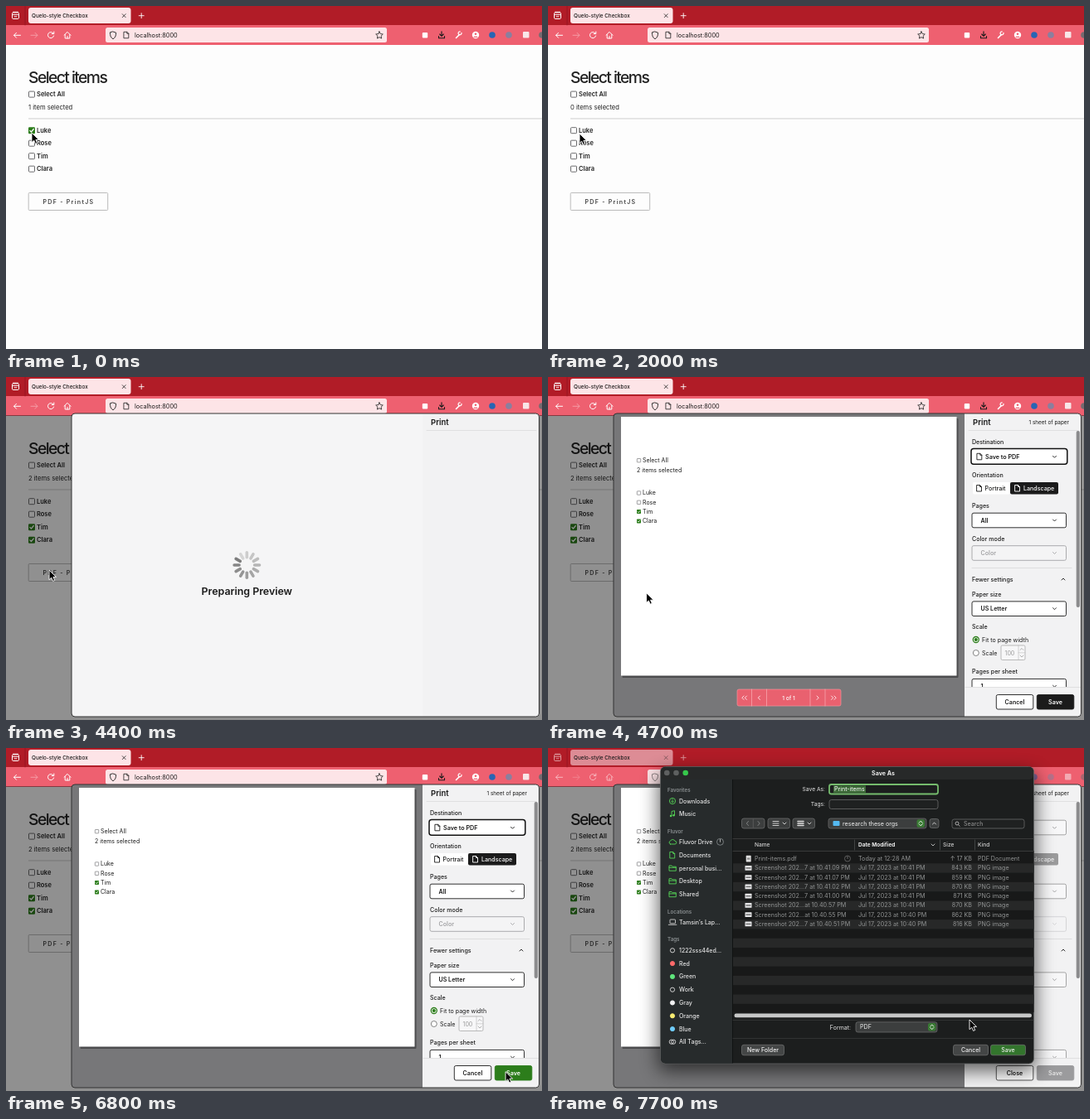
Write an HTML page that moves like this. It is 646 by 414 pixels and loops after 8 s.

```html
<!DOCTYPE html>
<html lang="en">
<head>
<meta charset="utf-8">
<title>Select items</title>
<style>
html, body { margin: 0; width: 100%; height: 100%; overflow: hidden; background: #fdfdfd; }
svg { display: block; width: 646px; height: 414px; font-family: Inter, Roboto, sans-serif; }
text { white-space: pre; }
</style>
</head>
<body>
<svg id="stage" viewBox="0 0 646 414"></svg>
<script>
const LOOP = 8000, STEP = 100;
const GREEN = '#2c7d1b', INK = '#1b1b1b';
const NAMES = ['Luke', 'Rose', 'Tim', 'Clara'];

// Markup helpers; text is placed by its vertical middle.
const text = (x, y, s, size = 7.1, fill = INK, weight = 400, extra = '') =>
  `<text x="${x}" y="${y + size * 0.36}" font-size="${size}" fill="${fill}" font-weight="${weight}" ${extra}>${s}</text>`;
const rect = (x, y, w, h, fill = 'none', r = 0, stroke = 'none', sw = 1, extra = '') =>
  `<rect x="${x}" y="${y}" width="${w}" height="${h}" rx="${r}" fill="${fill}" stroke="${stroke}" stroke-width="${sw}" ${extra}/>`;
const dot = (x, y, r, fill, stroke = 'none', sw = 0.9) =>
  `<circle cx="${x}" cy="${y}" r="${r}" fill="${fill}" stroke="${stroke}" stroke-width="${sw}"/>`;
const line = (d, stroke, sw = 1) =>
  `<path d="${d}" fill="none" stroke="${stroke}" stroke-width="${sw}" stroke-linecap="round" stroke-linejoin="round"/>`;
const group = (id, body, attrs = '') => `<g id="${id}" ${attrs}>${body}</g>`;
const chevron = (x, y, up, color = INK) => line(`M${x - 2} ${y + (up ? 1 : -1)}l2 ${up ? -2 : 2}l2 ${up ? 2 : -2}`, color, 0.9);
const sheet = (x, y, color) => line(`M${x} ${y}h3.5l2 2v5.5h-5.5zM${x + 3.5} ${y}v2h2`, color, 0.9);
const MIDDLE = 'text-anchor="middle"', RIGHT = 'text-anchor="end"';

function box(x, y, size, on) {
  const k = size / 8;
  if (!on) return rect(x + k / 2, y + k / 2, size - k, size - k, '#fff', 0.8 * k, '#6b6b6d', k);
  return rect(x, y, size, size, GREEN, 1.2 * k) +
    line(`M${x + 1.8 * k} ${y + 4.2 * k}l${1.6 * k} ${1.6 * k}l${2.9 * k} ${-3.5 * k}`, '#fff', 1.2 * k);
}

function browser() {
  const w = '#fff';
  return rect(0, 0, 646, 24, '#b11c27') + rect(0, 23, 646, 24, '#ee6070') +
    line('M23 0v23', '#8f1420', 0.7) + rect(27, 2, 123.5, 19, '#fde4e7', 3, 'none', 1, 'id="tab"') +
    text(31, 12, 'Quelo-style Checkbox', 6.35, INK, 500) +
    rect(120, 26, 339, 18, '#fde4e7', 2.5) + text(155, 35.3, 'localhost:8000', 7.3) +
    group('icons',
      rect(7.5, 8, 8, 7.5, 'none', 1.2, w, 1) + line('M7.5 10.5h8M10 12.8h3M8.5 7.2h6', w, 0.9) +
      line('M140.2 9.7l4 4m0-4l-4 4', '#222', 0.8) + line('M160.2 11.7h6m-3-3v6', w, 0.9) +
      line('M17.5 35.3h-8l3-3m-3 3l3 3', w, 1) + line('M30 35.3h8l-3-3m3 3l-3 3', '#f59ba5', 1) +
      line('M57 33a3.6 3.6 0 1 0 .6 3M57.8 31v2.6h-2.6', w, 1) +
      line('M70 35.3l4-4l4 4M71.2 34.6v4.4h5.6v-4.4M74 39v-2.5', w, 1) +
      line('M129 31l3.6 1.2c0 4-1 6-3.6 7.6c-2.6-1.6-3.6-3.6-3.6-7.6z', '#333', 1) + sheet(142.3, 31.3, '#333') +
      line('M450 30.8l1.3 2.8l3 .4l-2.2 2.1l.5 3l-2.6-1.4l-2.6 1.4l.5-3l-2.2-2.1l3-.4z', '#333', 0.9) +
      rect(501.8, 32, 6.4, 6.4, w, 1) +
      line('M525 30.8v5.5m-2.3-2.3l2.3 2.3l2.3-2.3M521.5 36.5v2.3h7v-2.3', INK, 1.1) +
      line('M542.5 38.5l4-4', w, 1.6) + line('M549 32.3a2 2 0 1 1-1.8-1.5', w, 1.2) +
      dot(566, 35, 4.2, w) + dot(566, 33.8, 1.3, '#ee6070') + line('M564.2 37.3h3.6', '#ee6070', 1.2) +
      dot(586, 35, 3.8, '#2765b4') + dot(606, 35, 3.8, '#8a7f9e') + rect(623, 31, 7.5, 7.5, '#f8e6e8', 1) +
      dot(646, 35, 3.8, '#766a70'));
}

function page() {
  return text(27, 86, 'Select items', 19.3, '#222', 500, 'letter-spacing="-1.55"') +
    text(37, 106.6, 'Select All', 7.5, '#222', 600) + group('boxes', '') +
    `<text id="count" x="27" y="125.2" font-size="7.6" fill="#222"></text>` +
    rect(27, 135.2, 619, 1.5, '#dedede') +
    NAMES.map((n, i) => text(37, 150.2 + 15.5 * i, n, 7.5, '#222', 600)).join('') +
    rect(27.2, 225.5, 95.5, 21, 'none', 1, 'none', 1, 'id="pdf"') +
    text(44.5, 236.3, 'PDF - PrintJS', 7, '#444', 600, 'letter-spacing="1.3"');
}

function select(y, label, dim) {
  const c = dim ? '#a3a3a5' : INK;
  return rect(511, y - 8.8, 113.5, 17.6, dim ? '#f4f4f5' : '#fff', 2, c, 0.9) +
    text(521.5, y + 0.2, label, 7.1, c, 600) + chevron(610.5, y, false, c);
}

function settings() {
  const label = (y, s) => text(511, y, s, 7.1, INK, 500);
  return label(78, 'Destination') + rect(511, 87.2, 113.5, 17.6, '#fff', 2, INK, 0.9) +
    group('focus', rect(510, 86.4, 115.8, 18.8, '#fff', 3, '#111', 1.5)) +
    sheet(517.3, 92.3, INK) + text(527, 96.2, 'Save to PDF', 7.2, INK, 600) + chevron(610.5, 96.3) +
    label(118.7, 'Orientation') + rect(512, 127, 45, 14.5, '#fff', 2) + sheet(517, 130.5, INK) +
    text(526.5, 134.3, 'Portrait', 7.1, INK, 500) + rect(557, 127, 58, 14.5, INK, 2) + sheet(563, 130.5, '#fff') +
    text(573, 134.3, 'Landscape', 7.1, '#fff', 500) +
    label(155, 'Pages') + select(173, 'All') +
    label(195.5, 'Color mode') + select(212.5, 'Color', true) +
    label(262, 'Paper size') + select(279.7, 'US Letter') +
    label(301.5, 'Scale') + dot(515.8, 317, 3.5, '#fff', GREEN, 1.3) + dot(515.8, 317, 2.1, GREEN) +
    text(523, 317, 'Fit to page width') + dot(515.8, 333, 3.5, '#fff', '#777') + text(523, 333, 'Scale') +
    rect(546, 324, 29, 17.5, '#f7f7f8', 1.5, '#aaa', 0.8) + text(550.5, 333, '100', 7.1, '#999') +
    line('M567 324v17.5M567 332.8h8', '#bbb', 0.6) + chevron(571, 328.5, true, '#aaa') + chevron(571, 337, false, '#aaa') +
    label(355.5, 'Pages per sheet') + select(373.2, '1') +
    group('hoverSheet', rect(510.5, 364, 114.5, 18.6, GREEN, 2) + text(521.5, 373.4, '1', 7.1, '#fff', 600) + chevron(610.5, 373.2, false, '#fff'));
}

const pill = (id, x, label, fill, color, stroke) => group(id,
  rect(x, 383.5, 44.5, 17.5, fill, 2, stroke, 0.9) + text(x + 22.2, 392.3, label, 7.1, color, 600, MIDDLE));

function pager() {
  const c = '#fff';
  return rect(228, 377, 125, 20, '#e9616f', 2, '#f3929b', 0.7) +
    line('M245.5 377v20M263.5 377v20M316 377v20M334 377v20', '#f6a4ac', 0.8) +
    text(290, 387.2, '1 of 1', 6.6, c, 500, MIDDLE) +
    line('M236 385l-2.2 2.2l2.2 2.2M239.5 385l-2.2 2.2l2.2 2.2M255.5 385l-2.2 2.2l2.2 2.2M324 385l2.2 2.2l-2.2 2.2M341.5 385l2.2 2.2l-2.2 2.2M345 385l2.2 2.2l-2.2 2.2', c, 0.8);
}

function preview() {
  const at = i => 139.8 + 11.3 * i;
  return rect(79, 44, 423, 366, '#777779') + rect(89.5, 50, 405, 313, '#4c4c4e', 1) + rect(88, 48, 404.5, 312.5, '#fff') +
    box(107, 98.2, 5, false) + text(114, 100.6, 'Select All', 7) + text(107, 112.2, '2 items selected', 7) +
    NAMES.map((n, i) => box(107, at(i) - 2.3, 5, i > 1) + text(114, at(i), n, 7)).join('') + group('pager', pager());
}

function printDialog() {
  return rect(0, 46, 646, 368, '#000', 0, 'none', 1, 'opacity=".43"') +
    rect(79, 44, 563.5, 366, '#f5f5f6', 4) +
    `<clipPath id="frame">${rect(79, 44, 563.5, 366, '#fff', 4)}</clipPath><clipPath id="scroll">${rect(502, 65, 141, 309, '#fff')}</clipPath>` +
    `<g clip-path="url(#frame)">` + rect(502, 44, 141, 366, '#f2f2f3') +
    text(512, 54.2, 'Print', 9.5, INK, 600) + line('M507 64.5h132', '#dcdcde', 0.8) +
    group('spinner', '') + group('loading', text(290.3, 258.5, 'Preparing Preview', 12.4, INK, 600, MIDDLE)) +
    group('loaded', preview() + text(628, 54.5, '1 sheet of paper', 6.4, INK, 400, RIGHT) +
      `<g clip-path="url(#scroll)">${group('settings', settings())}</g>` +
      line('M511 230.5h120', '#d8d8da', 0.8) + text(511, 244, 'Fewer settings', 7.1, INK, 500) + chevron(621, 244, true) +
      rect(636.7, 65, 4.3, 213, '#8d8d8f', 2) + line('M503 374.5h139', '#dcdcde', 0.8) +
      pill('cancel', 540.3, 'Cancel', '#fff', INK, INK) + pill('close', 540.3, 'Close', '#fff', INK, '#444') +
      pill('saveIdle', 589.3, 'Save', INK, '#fff', INK) + pill('saveHover', 589.3, 'Save', GREEN, '#fff', GREEN) +
      pill('savePressed', 589.3, 'Save', '#fff', GREEN, GREEN) + pill('saveOff', 589.3, 'Save', '#9b9b9d', '#e6e6e6', '#9b9b9d')) +
    '</g>' + rect(79, 44, 563.5, 366, 'none', 4, '#333', 1);
}

const ACCENT = '#55d356', PALE = '#e6e6e6', DIM = '#929494';

function sidebar() {
  const head = (y, s) => text(144, y, s, 6.2, '#8b9092', 600);
  const item = (y, s, icon) => icon + text(158, y, s, 7, PALE, 500);
  const folder = y => line(`M146 ${y + 2.8}v-5.8h3l1 1.2h4.3v4.6zM146 ${y - 0.6}h8.3`, ACCENT, 0.9);
  const cloud = y => line(`M147.5 ${y + 2.5}h5.5a1.8 1.8 0 0 0 0-3.6a3 3 0 0 0-5.5-.2a2 2 0 0 0 0 3.8z`, ACCENT, 0.9);
  const tags = [['1222sss44ed...'], ['Red', '#ff6a6a'], ['Green', '#5fe57c'], ['Work'], ['Gray', '#f2f2f2'], ['Orange', '#f8ec72'], ['Blue', '#70cdfb']];
  return head(50.5, 'Favorites') + item(64, 'Downloads', dot(150, 64, 3.6, 'none', ACCENT) + line('M150 62v3.6m-1.5-1.5l1.5 1.5l1.5-1.5', ACCENT, 0.8)) +
    item(79.8, 'Music', line('M149 82v-5.5l3.5-.8v5.3', ACCENT, 0.9) + dot(148, 82, 1.2, ACCENT) + dot(151.5, 81.2, 1.2, ACCENT)) +
    head(100.5, 'Fluvor') + item(113.5, 'Fluvor Drive', cloud(113.5)) + dot(207.5, 113.3, 4, 'none', '#8b9092', 0.8) + line('M207.5 113.3v-3', '#bbb', 0.9) +
    item(129.2, 'Documents', sheet(147.2, 125.5, ACCENT)) + item(145, 'personal busi...', folder(145)) +
    item(160.7, 'Desktop', folder(160.7)) + item(176.5, 'Shared', folder(176.5)) +
    head(197.3, 'Locations') + item(210.5, 'Tamsin\u2019s Lap...', rect(147, 207, 6.5, 4.8, 'none', 0.6, '#ccc', 0.9) + line('M145.3 213.3h9.6', '#ccc', 0.9)) +
    head(231, 'Tags') + tags.map(([s, c], i) => item(244.3 + 15.8 * i, s, dot(150, 244.3 + 15.8 * i, 2.6, c || 'none', c || '#ddd'))).join('') +
    item(354.7, 'All Tags...', dot(148.8, 354.7, 2.6, 'none', '#ddd') + dot(151.2, 354.7, 2.6, 'none', '#ddd'));
}

function fileTable() {
  const shots = [['..7 at 10.41.09', 843], ['..7 at 10.41.07', 859], ['..7 at 10.41.02', 870], ['..7 at 10.41.00', 871],
    ['..at 10.40.57', 870], ['..at 10.40.55', 862], ['..7 at 10.40.51', 816]];
  const rows = [['Print-items.pdf', 'Today at 12:28 AM', '\u2191 17 KB', 'PDF Document'],
    ...shots.map(([s, kb], i) => [`Screenshot 202.${s} PM`, `Jul 17, 2023 at 10:${i < 5 ? 41 : 40} PM`, `${kb} KB`, 'PNG image'])];
  let out = rect(223, 124, 362.5, 195, '#181919');
  for (let i = 1; i < 17; i += 2) out += rect(223, 139.3 + 11.3 * (i - 1), 362.5, 11.3, '#272828');
  out += line('M223 109.5h362M223 124.5h362', '#404242', 0.8) + line('M369.5 111v12M472.5 111v12M514.5 111v12', '#4b4d4d', 0.8) +
    text(249, 117, 'Name', 6.6, '#d2d2d2', 500) + text(374, 117, 'Date Modified', 6.5, '#eee', 700) + chevron(464, 117, false, '#ccc') +
    text(476, 117, 'Size', 6.6, '#d2d2d2', 500) + text(518, 117, 'Kind', 6.6, '#d2d2d2', 500);
  rows.forEach(([name, date, size, kind], i) => {
    const y = 133.6 + 11.25 * i;
    out += (i ? rect(237.5, y - 2.8, 8, 5.6, '#e6e6e8', 0.5) + rect(238.5, y - 0.6, 6, 1.4, '#666') : rect(238.7, y - 3.8, 6, 7.6, '#ddd', 0.6) + rect(240, y - 1, 3.4, 2, '#888')) +
      text(249, y, name, 7.2, DIM) + text(374, y, date, 7.2, DIM) + text(511, y, size, 7.1, DIM, 400, RIGHT) + text(518, y, kind, 7.1, DIM);
  });
  return out + dot(361, 133.5, 3.5, 'none', '#777', 0.7) + line('M361 133.5v-2.5', '#888', 0.7) + rect(224.5, 320.5, 358.5, 4.8, '#c6c7c7', 2.4);
}

function saveDialog() {
  const field = (x, y, w, h, fill = '#3c3e3e') => rect(x, y, w, h, fill, 2.5, '#737575', 0.7);
  const stepper = (x, y) => rect(x, y, 9.5, 9.5, '#3a7a34', 2) + chevron(x + 4.75, y + 3, true, '#fff') + chevron(x + 4.75, y + 6.6, false, '#fff');
  const button = (x, w, s, fill) => field(x, 358.3, w, 12.5, fill) + text(x + w / 2, 364.6, s, 7, '#f2f2f2', 500, MIDDLE);
  return `<filter id="soft" x="-20%" y="-20%" width="140%" height="140%"><feGaussianBlur stdDeviation="11"/></filter>` +
    rect(133, 30, 455, 360, '#000', 7, 'none', 1, 'opacity=".6" filter="url(#soft)"') +
    rect(135.5, 22.5, 450, 358.5, '#1c1e1e', 6, '#606262', 0.8) +
    `<path d="M142 23h80.5v357.5h-80.5a6 6 0 0 1-6-6v-345.5a6 6 0 0 1 6-6z" fill="#272b2c"/>` + line('M222.5 38v342', '#0d0e0e', 0.8) +
    rect(136, 23, 449, 15, '#272929', 5) + dot(143.3, 30, 3.3, '#5e6060') + dot(154.5, 30, 3.3, '#5e6060') + dot(165.7, 30, 3.3, '#36c84b') +
    text(404, 30, 'Save As', 7.1, '#eee', 700, MIDDLE) + sidebar() +
    text(334, 50, 'Save As:', 6.7, PALE, 400, RIGHT) + rect(339, 44, 131, 11.5, '#1c1e1e', 2.5, '#75bb6d', 1.8) +
    rect(344, 45.5, 39, 8.5, '#3d6a38') + text(345, 49.8, 'Print-items', 7.1, '#fff') +
    text(334, 68, 'Tags:', 6.7, PALE, 400, RIGHT) + field(339, 62.5, 131, 11, '#1f2121') +
    field(233.5, 85, 27.5, 12) + line('M247.3 86v10', '#666', 0.7) + line('M241.5 88.5l-2.2 2.5l2.2 2.5M253 88.5l2.2 2.5l-2.2 2.5', '#858787', 0.9) +
    field(265, 85, 26.5, 12) + line('M271 88.5h7M271 91h7M271 93.5h7', '#ddd', 0.9) + chevron(285, 91, false, '#ddd') +
    field(295, 85, 26.5, 12) + line('M301 88.5h7M301 91h7M301 93.5h7', '#ddd', 1.6) + chevron(315, 91, false, '#ddd') +
    field(338, 85, 118, 12) + rect(343.5, 88, 8, 6, '#54b9f1', 1) + text(355, 91, 'research these orgs', 7.1, '#f2f2f2') + stepper(444.5, 86.2) +
    field(460, 85.5, 11, 11) + chevron(465.5, 91, true, '#ddd') +
    field(487, 86, 87, 11, '#1f2121') + dot(493, 91, 2, 'none', '#ccc', 0.8) + line('M494.6 92.7l1.6 1.6', '#ccc', 0.8) + text(501, 91.4, 'Search', 7.1, '#999') +
    fileTable() + line('M223 328.5h362M223 350.5h362', '#3b3d3d', 0.7) +
    text(365, 337, 'Format:', 7, PALE, 400, RIGHT) + field(371, 330.7, 98, 12.3) + text(376, 336.9, 'PDF', 7.1, '#eee') + stepper(458, 332) +
    button(233.5, 51, 'New Folder', '#444646') + button(488.5, 42, 'Cancel', '#444646') + button(533.5, 42, 'Save', '#33752d');
}

const stage = document.getElementById('stage');
stage.innerHTML = rect(0, 0, 646, 414, '#fdfdfd') + page() + browser() + group('printDialog', printDialog()) + group('saveDialog', saveDialog()) +
  group('cursor', `<path d="M0 0V11.7L2.7 9.2L4.6 13.4L6.7 12.5L4.9 8.4H8.5Z" fill="#000" stroke="#fff" stroke-width=".9" stroke-linejoin="round"/>`);
const $ = id => document.getElementById(id);
const show = (id, on) => { $(id).style.display = on ? '' : 'none'; };

// Pointer stops: time, x, y.
const PATH = [[0, 31, 153], [300, 31, 166], [500, 32, 167], [700, 31, 181], [900, 33, 180], [1200, 31, 104], [1900, 31, 104],
  [2000, 38, 154], [2400, 64, 240], [2800, 58, 226], [3200, 31, 195], [3300, 31, 195], [3500, 31, 178], [3700, 31, 178],
  [4000, 52, 233], [4600, 52, 233], [4900, 309, 340], [5100, 309, 340], [5500, 610, 106], [5600, 610, 106],
  [5800, 562, 366], [6200, 603, 391], [6700, 603, 391], [7100, 597, 389], [7200, 597, 389], [7400, 589, 385], [7500, 580, 378], [7700, 508, 328]];

// Checked rows as a bit mask, from the given time on.
const CHECKS = [[0, 1], [300, 3], [700, 7], [1300, 15], [1700, 0], [3200, 8], [3500, 12]];

function pointerAt(t) {
  const i = PATH.findIndex(p => p[0] > t);
  if (i < 0) return PATH[PATH.length - 1].slice(1);
  const [a, b] = [PATH[i - 1], PATH[i]];
  const u = (t - a[0]) / (b[0] - a[0]), k = u * u * (3 - 2 * u);
  return [a[1] + (b[1] - a[1]) * k, a[2] + (b[2] - a[2]) * k];
}

function spokes(t) {
  let out = '';
  for (let i = 0; i < 12; i++) {
    const age = (t / STEP + 86 - i) % 12;
    const shade = Math.round(125 + age * 8);
    out += rect(288.5, 210, 3.6, 9.5, `rgb(${shade},${shade},${shade})`, 1.8, 'none', 1, `transform="rotate(${i * 30} 290.3 227)"`);
  }
  return out;
}

function render(time) {
  const t = Math.floor(time % LOOP / STEP) * STEP;
  const [x, y] = pointerAt(t);
  const mask = CHECKS.filter(c => c[0] <= t).pop()[1];
  const on = NAMES.map((_, i) => mask >> i & 1);
  const total = on.reduce((a, b) => a + b);
  const printing = t >= 4200, loaded = t >= 4600, saving = t >= 7500;

  $('boxes').innerHTML = box(27, 102.6, 8, total === 4) + on.map((v, i) => box(27, 146.2 + 15.5 * i, 8, v)).join('');
  $('count').textContent = `${total} item${total === 1 ? '' : 's'} selected`;
  $('pdf').setAttribute('stroke', !printing && y > 225 ? '#888' : '#bbb');

  show('printDialog', printing);
  show('loading', !loaded);
  show('spinner', !loaded);
  $('spinner').innerHTML = spokes(t);
  show('loaded', loaded);
  show('pager', t >= 4700 && t < 6100);
  show('focus', t < 6900);
  show('hoverSheet', x > 511 && x < 625 && y > 364 && y < 374);
  $('settings').setAttribute('opacity', saving ? 0.4 : 1);

  const over = x >= 589 && y >= 383;
  show('cancel', !saving);
  show('close', saving);
  show('saveIdle', t < 6900 && !over);
  show('saveHover', t < 6900 && over);
  show('savePressed', t >= 6900 && !saving);
  show('saveOff', saving);
  show('saveDialog', saving);
  $('tab').setAttribute('fill', saving ? '#dd8c95' : '#fde4e7');
  $('icons').setAttribute('opacity', saving ? 0.55 : 1);
  $('cursor').setAttribute('transform', `translate(${x} ${y})`);
}

const start = performance.now();
function tick() {
  render(performance.now() - start);
  requestAnimationFrame(tick);
}
tick();
</script>
</body>
</html>
```
